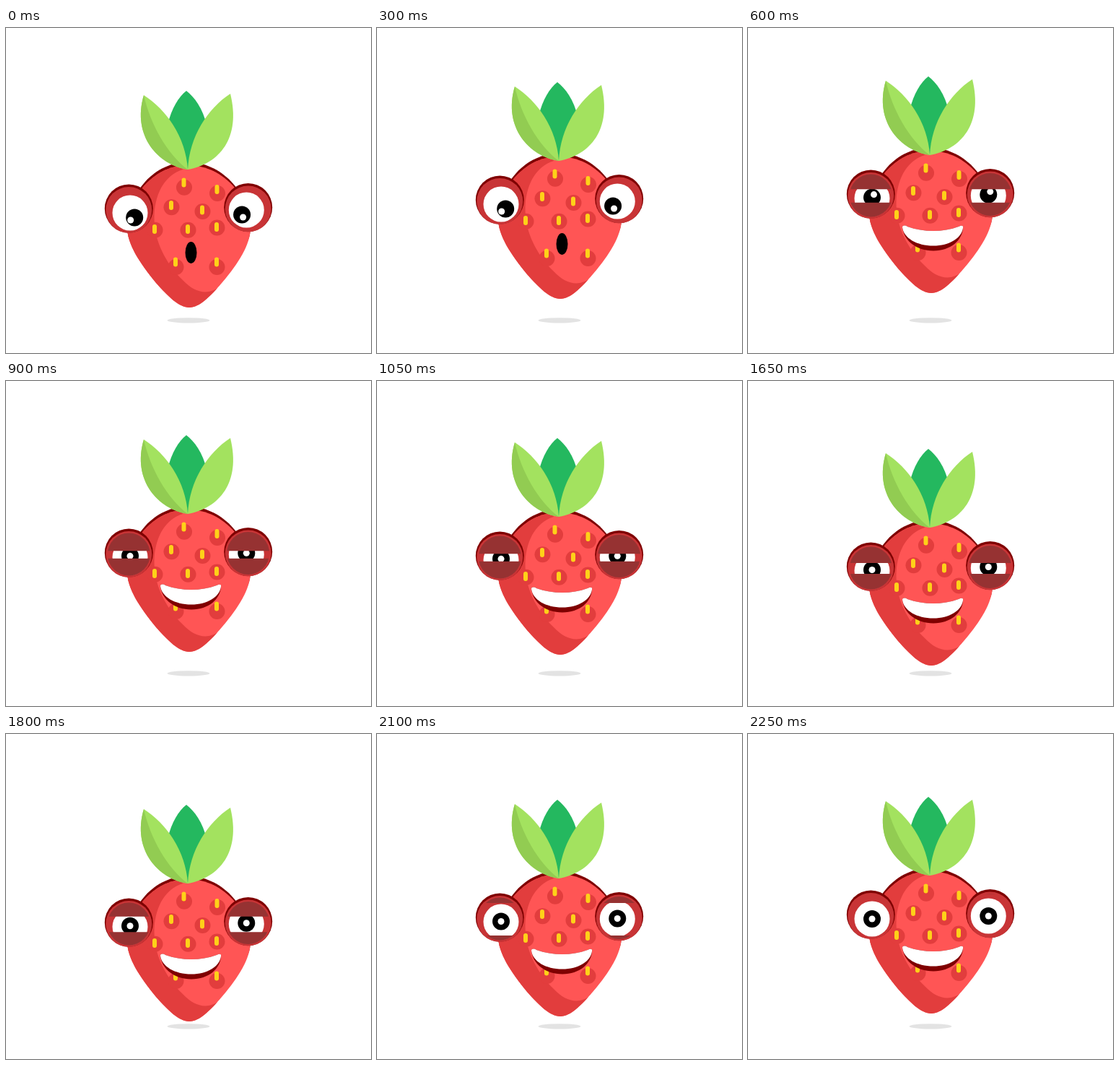
An HTML page for the animation above (2400 ms loop, 506 by 450 pixels).

```html
<!DOCTYPE html>
<html lang="en">
<head>
<meta charset="utf-8">
<title>Strawberry</title>
<style>
  html, body { margin: 0; width: 100%; height: 100%; overflow: hidden; background: #fff; }
  svg { display: block; width: 506px; height: 450px; }
</style>
</head>
<body>
<svg viewBox="0 0 506 450">
  <defs>
    <path id="skin" d="M254 387C240 387 225 372 208 353C186 326 168 300 168 276C168 238 202 190 252 190C304 190 339 238 339 276C339 300 322 326 300 352C283 372 268 387 254 387Z"/>
    <clipPath id="skinClip"><use href="#skin"/></clipPath>
    <clipPath id="lidClip"><rect id="lidTop" x="130" y="200" width="250"/><rect id="lidLow" x="130" width="250" height="120"/></clipPath>
  </defs>
  <ellipse cx="253" cy="404.8" rx="29.5" ry="3.6" fill="#e3e3e3"/>
  <g id="berry">
    <path fill="#7f0000" d="M254 380C186 326 168 300 168 276C168 235 200 186 252 186C304 186 339 235 339 276C339 300 322 326 254 380Z"/>
    <use href="#skin" fill="#ff5555"/>
    <path clip-path="url(#skinClip)" fill="#e23d3d" d="M245 196C215 205 203 240 206 272C208 300 225 330 245 349C262 367 280 371 298 357L330 420H100V180H245Z"/>
    <g id="seeds"></g>
    <path fill="#24b85f" d="M250 87C239 96 230 110 224 134L252 196L278 134C273 112 261 95 250 87Z"/>
    <path fill="#a3e25f" d="M191 93C222 113 249 150 252 196C212 190 174 150 191 93Z"/>
    <path fill="#92cc52" d="M191 93C200 133 223 174 252 196C212 190 174 150 191 93Z"/>
    <path fill="#a3e25f" d="M311 91C280 111 254 150 252 196C296 188 326 152 311 91Z"/>
    <ellipse id="gasp" cx="256.5" cy="311" rx="8" ry="15"/>
    <g id="smile">
      <path fill="#7f0000" d="M214 296C214 293 218 293 221 295C244 303 270 303 292 295C296 293 299 293 298 297C297 314 281 328.5 257 328.5C233 328.5 216 314 214 296Z"/>
      <path fill="#fff" d="M214 296C214 293 218 293 221 295C244 303 270 303 292 295C296 293 299 293 298 297C296 311 279 321.5 257 321.5C234 321.5 216 311 214 296Z"/>
    </g>
    <g id="eyes"></g>
  </g>
</svg>
<script>
const STEP = 150, COUNT = 16;
const $ = id => document.getElementById(id);

function add(parent, tag, attrs) {
  const el = document.createElementNS("http://www.w3.org/2000/svg", tag);
  for (const k in attrs) el.setAttribute(k, attrs[k]);
  return parent.appendChild(el);
}
const disc = (parent, cx, cy, r, fill) => add(parent, "circle", { cx, cy, r, fill });

function place(el, x, y) {
  el.setAttribute("cx", x);
  el.setAttribute("cy", y);
}

// Dimples sink further below their seeds away from the middle row.
function seed(x, y) {
  disc($("seeds"), x + 0.5, y + Math.abs(y - 268) / 8, 11, "#e23d3d");
  add($("seeds"), "rect", { x: x - 3, y: y - 6.5, width: 6, height: 13, rx: 3, fill: "#ffd119" });
}
seed(246.5, 214);
seed(292.5, 223.5);
seed(229, 245.5);
seed(272, 252);
seed(206, 278.5);
seed(252, 278.5);
seed(292, 275.5);
seed(235, 324);
seed(292, 324);

// side is 1 for the left eye, -1 for the right: the direction of the nose
function makeEye(side, x, y, rimX, rimY) {
  const g = $("eyes");
  disc(g, rimX, rimY, 33.5, "#7f0000");
  disc(g, rimX, rimY + 2, 32, "#c83436");
  disc(g, x, y, 24.5, "#fff");
  const pupil = disc(g, 0, 0, 12, "#000");
  const glint = disc(g, 0, 0, 4.5, "#fff");
  disc(g, rimX, rimY + 2, 29.5, "#963232").setAttribute("clip-path", "url(#lidClip)");
  return { side, x, y, pupil, glint };
}
const eyes = [makeEye(1, 172, 256, 170.3, 250), makeEye(-1, 333.3, 252, 335.7, 248.5)];

// Linear bob: highest at step 4, lowest at step 12.
function lift(s) {
  const n = s < 2 ? s - 1 : s;
  const level = 8 - Math.abs(8 - Math.abs(n - 4));
  return Math.round(level * 3.875 - 19.7);
}

// Half the gap between the lids: snaps narrow, holds, then eases open.
function lidGap(s) {
  return 5.2 + 0.5 * Math.max(1.3 * (6 - s), s - 9, 0) ** 2.2;
}

function look({ side, x, y, pupil, glint }, gasping, s, gap) {
  const up = Math.max(0, (6 - s) / 2);
  const squint = Math.max(0, 1 - gap / 30);
  const px = x + (gasping ? 6.2 * side : 0);
  const py = y + (gasping ? 6.5 : -2 * squint);
  place(pupil, px, py);
  if (gasping) place(glint, px - 2 - 3.5 * side, py + 3.5);
  else place(glint, px + 2.5 * up, py - 4 * up);
}

function show(s) {
  const gasping = s < 3;
  const gap = gasping ? 40 : lidGap(s);
  $("berry").setAttribute("transform", `translate(0 ${lift(s)})`);
  $("lidTop").setAttribute("height", 52.5 - gap);
  $("lidLow").setAttribute("y", 252.5 + gap);
  eyes.forEach(e => look(e, gasping, s, gap));
  $("gasp").style.display = gasping ? "" : "none";
  $("smile").style.display = gasping ? "none" : "";
}

let start, last = 0;
function tick(now) {
  start ??= now;
  const s = Math.floor((now - start) / STEP) % COUNT;
  if (s !== last) show(last = s);
  requestAnimationFrame(tick);
}
show(0);
requestAnimationFrame(tick);
</script>
</body>
</html>
```
